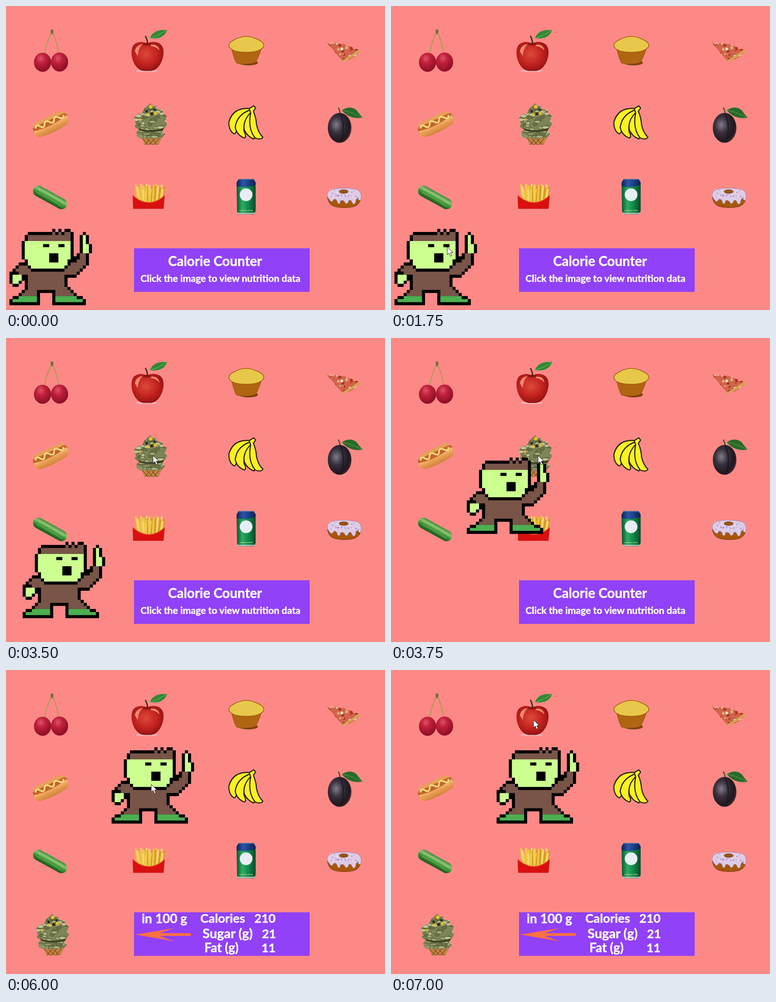
An HTML page for the animation above (8000 ms loop, 835 px wide and 670 px high).

```html
<!DOCTYPE html>
<html lang="en">
<head>
<meta charset="utf-8">
<title>Calorie Counter</title>
<style>
  html, body { margin: 0; width: 100%; height: 100%; overflow: hidden; background: #fd8987; }
  svg { display: block; width: 100%; height: 100%; }
  text { font-family: Lato, "Open Sans", sans-serif; font-weight: 700; fill: #fff; }
  .bold { stroke: #fff; stroke-width: .5; }
</style>
</head>
<body>
<svg viewBox="0 0 835 670" xmlns="http://www.w3.org/2000/svg">
  <defs>
    <radialGradient id="cherry" cx=".4" cy=".3" r=".75">
      <stop offset="0" stop-color="#dd5468"/><stop offset=".35" stop-color="#c0203b"/><stop offset="1" stop-color="#860d22"/>
    </radialGradient>
    <radialGradient id="apple" cx=".45" cy=".42" r=".62">
      <stop offset="0" stop-color="#dc4a3c"/><stop offset=".55" stop-color="#c4231f"/><stop offset="1" stop-color="#8f1010"/>
    </radialGradient>
    <radialGradient id="plum" cx=".36" cy=".4" r=".68">
      <stop offset="0" stop-color="#827c8a"/><stop offset=".4" stop-color="#37303c"/><stop offset=".8" stop-color="#1f181f"/><stop offset="1" stop-color="#45292f"/>
    </radialGradient>
    <linearGradient id="cucumber" x2="0" y2="1">
      <stop offset="0" stop-color="#3f8a35"/><stop offset=".3" stop-color="#8cc272"/><stop offset=".55" stop-color="#3f9a38"/><stop offset="1" stop-color="#1c5519"/>
    </linearGradient>
    <linearGradient id="bun" x2="0" y2="1">
      <stop offset="0" stop-color="#f6c380"/><stop offset=".5" stop-color="#e79b4e"/><stop offset="1" stop-color="#d0813c"/>
    </linearGradient>
    <linearGradient id="can">
      <stop offset="0" stop-color="#07552f"/><stop offset=".3" stop-color="#2cab63"/><stop offset=".65" stop-color="#0f8546"/><stop offset="1" stop-color="#06492b"/>
    </linearGradient>
    <linearGradient id="canTop">
      <stop offset="0" stop-color="#0c2258"/><stop offset=".35" stop-color="#2a56a6"/><stop offset="1" stop-color="#0c2054"/>
    </linearGradient>
    <clipPath id="scoops"><path d="M318 214L323 220L331 221L334 229L345 228L346 237L354 242L351 252L355 261L348 270L345 275L350 282L343 291L336 306H306L300 293L289 288L287 278L294 272L284 267L286 257L281 249L288 239L299 238L305 226Z"/></clipPath>
    <clipPath id="slice"><path d="M707 80L745 84L781 98L771 111L743 123L727 105Z"/></clipPath>
  </defs>

  <rect width="835" height="670" fill="#fd8987"/>

  <g id="cherries">
    <path d="M101 56Q90 78 84 107M102 56Q112 78 117 108" fill="none" stroke="#a99a50" stroke-width="2"/>
    <path d="M98 53l5-2 2 5-3 7-3-2z" fill="#7d6a38"/>
    <ellipse cx="80.5" cy="124" rx="19" ry="21" fill="url(#cherry)"/>
    <ellipse cx="118" cy="123.5" rx="19" ry="21" fill="url(#cherry)"/>
  </g>

  <g id="redApple">
    <ellipse cx="310" cy="143" rx="24" ry="2.5" fill="#e8b8bc"/>
    <path d="M311 83C320 77 333 78 341 85C350 93 348 112 342 124C335 138 326 145 311 143C297 145 288 138 281 124C275 110 275 94 281 86C289 78 302 77 311 83Z" fill="url(#apple)"/>
    <path d="M284 100Q286 86 301 84Q292 92 290 110ZM319 85Q336 84 338 98Q331 90 319 88Z" fill="#ee8a6c"/>
    <ellipse cx="311" cy="84" rx="10" ry="3" fill="#8f1513"/>
    <path d="M312 84Q312 75 307 66" fill="none" stroke="#4a2b17" stroke-width="3"/>
    <path d="M317 71Q325 50 355 53Q347 75 317 71Z" fill="#2f8a32"/>
    <path d="M318 71Q335 66 353 54" fill="none" stroke="#83c26a"/>
  </g>

  <g id="muffin">
    <ellipse cx="534" cy="125" rx="21" ry="6" fill="#7d400c"/>
    <path d="M497 94Q502 116 508 126Q530 131 550 124Q558 110 563 93Z" fill="#b06510" stroke="#8f500c"/>
    <path d="M491 86C491 78 515 67 529 67C545 67 568 78 568 86C568 97 548 102 530 102C508 102 491 97 491 86Z" fill="#e8c84a" stroke="#a25a10" stroke-width="1.5"/>
  </g>

  <g id="pizza" clip-path="url(#slice)">
    <path d="M700 70h90v60h-90z" fill="#cf654a"/>
  </g>
  <path d="M780 98Q766 108 742 122" fill="none" stroke="#d8a352" stroke-width="5"/>

  <g id="hotdog" transform="translate(98 260) rotate(-25)">
    <rect x="-37" y="-17" width="76" height="23" rx="11" fill="#e6a159"/>
    <rect x="-41" y="-9" width="83" height="13" rx="6.5" fill="#c4662c"/>
    <path d="M-40 -1Q-2 8 40 -3Q44 10 33 16Q0 22 -32 17Q-43 12 -40 -1Z" fill="url(#bun)"/>
    <path d="M-34 -5q5-9 11 0t11 0t12 0t11 0t12 0t11-1" fill="none" stroke="#f7dc83" stroke-width="3.6"/>
  </g>

  <g id="bananas" fill="#fbf022" stroke="#25201a" stroke-width="2.4" stroke-linejoin="round">
    <path d="M537 226Q500 223 491 256Q491 276 503 282Q509 279 507 270Q508 250 538 232Z"/>
    <path d="M538 229Q508 240 505 268Q509 285 525 291Q531 288 525 278Q520 258 541 236Z"/>
    <path d="M541 233Q521 252 525 273Q532 288 546 293Q551 289 544 280Q534 262 545 238Z"/>
    <path d="M536 226L546 220L550 225L545 232Q551 246 552 262Q556 280 566 289Q562 296 549 291Q532 270 539 236Z"/>
  </g>

  <g id="plumFruit">
    <path d="M736 238Q736 230 732 224" fill="none" stroke="#4b4a25" stroke-width="2.5"/>
    <path d="M740 230Q756 218 772 229Q780 240 786 246Q757 251 740 230Z" fill="#286b28"/>
    <path d="M742 230Q763 234 785 246" fill="none" stroke="#6f9d4c"/>
    <ellipse cx="735" cy="268.5" rx="26" ry="33" fill="url(#plum)"/>
    <path d="M737 238Q748 262 739 300" fill="none" stroke="#120e18" stroke-width="1.5"/>
  </g>

  <g id="cuke" transform="translate(97 422) rotate(29)">
    <rect x="-41" y="-12" width="82" height="24" rx="12" fill="url(#cucumber)"/>
    <path d="M-32-3Q0-9 33-2M-30 4Q0 2 32 5" fill="none" stroke="#a7ce88" stroke-width="1.2" opacity=".6"/>
  </g>

  <g id="fries"></g>
  <path d="M279 417Q315 449 350 417L347 447H280Z" fill="#d9100f"/>
  <path d="M279 417Q315 449 350 417" fill="none" stroke="#f05a2a" stroke-width="1.5"/>

  <g id="soda">
    <path d="M508 389L513 381H545L550 389V452L546 459H513L509 453Z" fill="url(#can)"/>
    <path d="M508 389L513 381H545L550 389V394Q529 402 508 397Z" fill="url(#canTop)"/>
    <path d="M513 382H545" stroke="#5f83ae" stroke-width="1.5"/>
    <circle cx="529" cy="416" r="14" fill="#e6eef4"/>
    <text x="529" y="452" text-anchor="middle" font-size="4.5" style="fill:#e6e58b">cold lime drink</text>
    <path d="M511 457H548" stroke="#b9c8c6" stroke-width="2.5"/>
  </g>

  <g id="donut">
    <path d="M708 417Q708 437 724 442Q745 447 767 442Q783 436 782 417Z" fill="#a8560c" stroke="#6d380a"/>
    <path d="M708 420Q705 404 730 402Q760 400 776 406Q785 413 782 426Q779 432 775 424Q771 423 770 433Q766 441 762 432Q760 426 755 429Q753 437 748 435Q744 426 737 429Q736 438 731 435Q729 424 722 426Q719 434 714 429Z" fill="#ddcbe6" stroke="#96759a" stroke-width=".8"/>
    <ellipse cx="744" cy="409" rx="10" ry="4" fill="#9a5315" stroke="#6d380a"/>
  </g>

  <g id="icecream">
    <g clip-path="url(#scoops)">
      <path d="M275 210h85v100h-85z" fill="#7d8456"/>
      <g id="blobs" stroke="#4a4d2d"></g>
      <path d="M290 269Q318 279 349 268L345 275Q318 281 293 274Z" fill="#3d4024"/>
      <path d="M298 290Q318 295 342 289L338 308H302Z" fill="#c38545"/>
      <path d="M300 291l14 16M310 292l14 15M321 292l13 15M338 291l-13 16M328 292l-14 15M318 292l-13 15" stroke="#7e4a20" stroke-width="1.3"/>
    </g>
    <g fill="#e8bd2c"><circle cx="319" cy="222" r="4"/><circle cx="313" cy="239" r="3"/><circle cx="329" cy="236" r="3.5"/><circle cx="295" cy="250" r="2.5"/></g>
    <g fill="#2b2b16"><circle cx="310" cy="232" r="3"/><circle cx="327" cy="229" r="2.5"/><circle cx="321" cy="238" r="3"/></g>
  </g>

  <rect x="282" y="534" width="387" height="96" fill="#9141f7"/>
  <g id="intro" class="bold" text-anchor="middle">
    <text x="460.5" y="573" font-size="29.5">Calorie Counter</text>
    <text x="472.5" y="608" font-size="21.2">Click the image to view nutrition data</text>
  </g>
  <g id="facts" class="bold" font-size="28">
    <text x="299" y="558">in 100 g</text>
    <text x="428" y="557" font-size="27.5">Calories</text><text x="594" y="557" text-anchor="end" font-size="27">210</text>
    <text x="433" y="591" font-size="29">Sugar (g)</text><text x="595" y="591" text-anchor="end" font-size="27">21</text>
    <text x="437" y="622">Fat (g)</text><text x="594" y="622" text-anchor="end" font-size="27">11</text>
    <path d="M285 583L371 569L338 580H407V586H338L371 598Z" fill="#ff7043" stroke="none"/>
  </g>

  <g id="hero">
    <path d="M14 0h1v1h-1zM16 0h1v1h-1zM18 0h2v1h-2zM6 1H21V9H22V8H23V2H24V1H25V2H26V5H27V8H26V12H25V13H24V14H23V15H22V16H19V19H20V20H21V21H22V22H24V23H25V25H14V21H10V25H0V23H1V22H3V21H4V20H5V17H4V18H3V19H1V18H0V14H1V13H2V12H3V11H5V10H4V4H5V2H6Z"/>
    <path fill="#795548" d="M6 2H14V1H15V2H16V1H17V2H18V1H20V4H6ZM23 8H25V12H24V13H23V14H22V15H18V19H19V20H20V21H21V22H15V20H9V22H4V21H5V20H6V15H3V14H2V13H3V12H6V13H7V14H18V13H19V12H20V11H22V10H23Z"/>
    <path fill="#ccff90" d="M6 4H20V10H19V12H18V13H7V12H6V10H5V4ZM24 2H25V5H26V8H24ZM1 15H4V17H3V18H1Z"/>
    <path fill="#4caf50" d="M3 22H9V24H1V23H3ZM15 22H22V23H24V24H15Z"/>
    <path d="M11 5h2v1h-2zM16 5h2v1h-2zM13 8h3v3h-3z"/>
  </g>

  <path id="cursor" d="M0 0V17L4 13.5L7 20.5L10 19.2L7.2 12.5H12.5Z" fill="#fff" stroke="#222" stroke-width="1"/>
</svg>
<script>
const LOOP = 8000;
const UNIT = 6.73;
const el = id => document.getElementById(id);

function seeded(seed) {
  return (lo, hi) => {
    seed = seed * 16807 % 2147483647;
    return lo + (hi - lo) * seed / 2147483647;
  };
}

function add(parent, tag, attrs) {
  const node = document.createElementNS('http://www.w3.org/2000/svg', tag);
  for (const key in attrs) node.setAttribute(key, attrs[key]);
  el(parent).append(node);
}

function scatter(parent, count, seed, make) {
  const rnd = seeded(seed);
  for (let i = 0; i < count; i++) add(parent, ...make(rnd, i));
}

scatter('blobs', 75, 4211, (rnd, i) => ['ellipse', {
  cx: rnd(280, 356), cy: rnd(222, 292), rx: rnd(4, 9), ry: rnd(2.5, 5),
  fill: ['#a9b07e', '#8f9765', '#bcc391', '#6a7146'][i % 4]
}]);

scatter('pizza', 46, 977, (rnd, i) => ['circle', {
  cx: rnd(710, 778), cy: rnd(81, 118), r: rnd(1.2, 3.6),
  fill: ['#f4dcc0', '#c0271f', '#e8a87c', '#a53222'][i % 4]
}]);

scatter('fries', 34, 613, (rnd, i) => {
  const x = 285 + i * 13 % 34 * 1.9, top = rnd(392, 408);
  return ['path', {
    d: `M${x + rnd(-3, 3)} ${top}L${315 + (x - 315) * .8} 434`,
    stroke: ['#f0c440', '#d39a26', '#f5d768'][i % 3], 'stroke-width': 4
  }];
});

scatter('donut', 26, 359, (rnd, i) => {
  const x = 714 + i * 2.45, y = i % 2 ? rnd(415, 424) : rnd(404, 413);
  const inHole = Math.abs(x - 744) < 12 && y < 414;
  return ['path', {
    d: `M${x} ${inHole ? 419 : y}l${rnd(-2.5, 2.5)} ${rnd(-2, 2)}`,
    stroke: i % 3 ? '#70479b' : '#fff', 'stroke-width': 1.4
  }];
});

// Each entry: start time, x, y
const heroSteps = [[0, 7.7, 491.2], [3500, 36.7, 449.2], [3750, 167, 263.6], [4000, 232.7, 170.2]];
const cursorSteps = [
  [500, 100, 568], [750, 113, 563], [1750, 124, 531], [2000, 224, 381],
  [2250, 297, 292], [2500, 331, 274], [2750, 324, 259], [6000, 320, 252],
  [6250, 319, 215], [6500, 317, 145], [6750, 317, 123], [7000, 314, 110]
];

const current = (steps, t) => steps.filter(s => s[0] <= t).pop();
const show = (id, on) => el(id).setAttribute('visibility', on ? 'visible' : 'hidden');
const move = (id, x, y, scale = 1) =>
  el(id).setAttribute('transform', `translate(${x} ${y}) scale(${scale})`);

function draw(t) {
  const chosen = t >= 4000;
  const [, hx, hy] = current(heroSteps, t);
  move('hero', hx, hy, UNIT);

  const tip = current(cursorSteps, t);
  show('cursor', tip);
  if (tip) move('cursor', tip[1], tip[2]);

  move('icecream', chosen ? -216 : 0, chosen ? 323 : 0);
  show('intro', !chosen);
  show('facts', chosen);
}

const start = performance.now();
function tick() {
  draw((performance.now() - start) % LOOP);
  requestAnimationFrame(tick);
}
tick();
</script>
</body>
</html>
```
